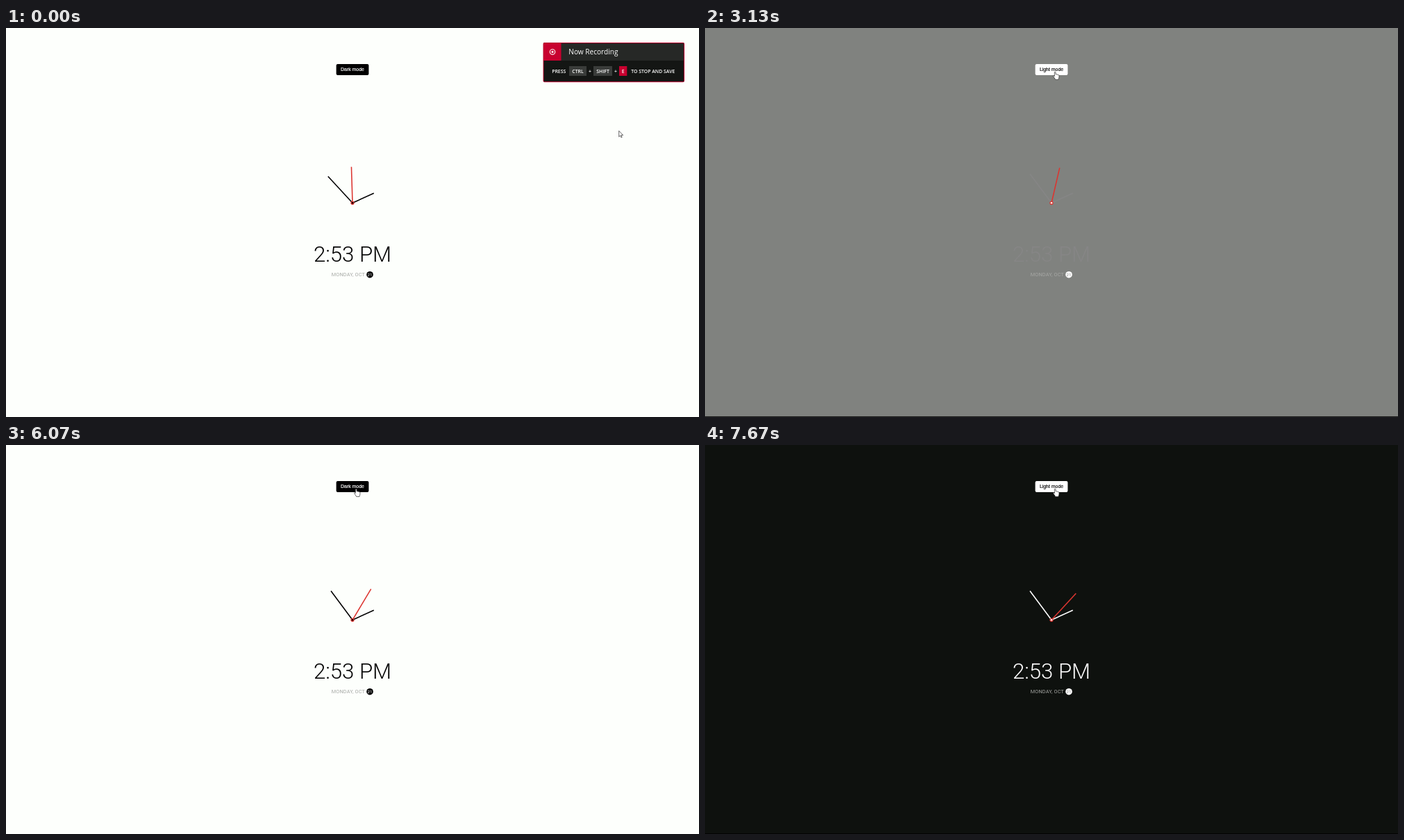
Animation, 998 px wide and 561 px high, one loop 8 s. Source, as an HTML page:

```html
<!DOCTYPE html>
<html lang="en">
<head>
<meta charset="utf-8">
<title>Theme clock</title>
<style>
  html, body { margin: 0; width: 100%; height: 100%; overflow: hidden; background: #fdfffc; }
  svg { display: block; width: 100vw; height: 100vh; }
  text { text-anchor: middle; font-family: Roboto, sans-serif; }
  .button { font: 6.93px "Liberation Sans", Arial, sans-serif; stroke-width: .18; }
  .time { font-size: 31.2px; font-weight: 300; }
  .date { font-size: 7.28px; letter-spacing: .156px; text-anchor: start; fill: #a6a8a5; }
  .day { font-size: 6.24px; }
  #panel text { font: 600 6.9px "Open Sans", "Noto Sans", sans-serif; fill: #fff; }
  #panel .title { font-size: 10.1px; font-weight: 500; text-anchor: start; }
</style>
</head>
<body>
<svg viewBox="0 0 998 561" preserveAspectRatio="none">
  <rect id="page" width="998" height="561"/>
  <rect id="edge" y="560" width="998" height="1" fill="#000"/>

  <rect id="button" x="475.6" y="52" width="46.8" height="16.1" rx="2"/>
  <text id="label" class="button" x="499" y="62.4"></text>

  <g transform="translate(499 252.3)">
    <rect id="hour" x="-.78" y="-33.8" width="1.56" height="33.8"/>
    <rect id="minute" x="-.78" y="-52" width="1.56" height="52"/>
    <rect id="second" x="-.78" y="-52" width="1.56" height="52" fill="#dc3530"/>
    <circle r="2.6" fill="#dc3530"/>
    <circle id="pin" r="1.3"/>
  </g>

  <text id="time" class="time" x="499" y="337.4">2:53 PM</text>
  <text class="date" x="468.8" y="358.1">MONDAY, OCT</text>
  <circle id="badge" cx="524" cy="355.7" r="4.8"/>
  <text id="day" class="day" x="524" y="358">21</text>

  <g id="panel">
    <rect x="774" y="21.5" width="202.6" height="56.2" rx="1.5" fill="#141614"/>
    <rect x="774" y="21.5" width="202.6" height="25.5" fill="#262826"/>
    <rect x="774" y="21.5" width="25.5" height="25.5" fill="#c8002f"/>
    <rect x="774" y="21.5" width="202.6" height="56.2" rx="1.5" fill="none" stroke="#b8062f"/>
    <circle cx="787" cy="34.4" r="3.7" fill="none" stroke="#fff" stroke-width="1.1"/>
    <circle cx="787" cy="34.4" r="1.6" fill="#fff"/>
    <text class="title" x="810.3" y="38.3">Now Recording</text>
    <rect x="811" y="55" width="25" height="14" fill="#3a3c3a"/>
    <rect x="846" y="55" width="27" height="14" fill="#3a3c3a"/>
    <rect x="883" y="55" width="11.3" height="14" fill="#c8002f"/>
    <text x="796.2" y="64.9">PRESS</text>
    <text x="823.5" y="64.9">CTRL</text>
    <text x="841" y="64.9">+</text>
    <text x="859.5" y="64.9">SHIFT</text>
    <text x="878" y="64.9">+</text>
    <text x="888.6" y="64.9">E</text>
    <text x="931.8" y="64.9">TO STOP AND SAVE</text>
  </g>

  <g id="cursor" fill="#fff" stroke="#222" stroke-width="1.3" stroke-linejoin="round">
    <path id="arrow" d="M0 0V16.5L3.8 13 6.2 18.6 8.6 17.6 6.2 12H11.5Z"/>
    <path id="hand" d="M-1.7 1.5C-1.7-.5 1.7-.5 1.7 1.5V7C2.5 6.2 4.6 6.4 4.9 7.8C5.8 7 7.7 7.3 8 8.6C9 8 11 8.4 11 10.2V14.5C11 17 9.6 18.5 9.2 21.5H.6C0 18.5-3.6 15.5-5.2 12.2C-5.7 10.4-3.6 9.9-2.6 11.2L-1.7 12.4Z"/>
  </g>
</svg>
<script>
const LOOP = 8000;
const LEAD = 25;               // each tick begins this long before the full second
const STEP = 360 / 59;         // degrees per second or minute
const CLICKS = [2793, 4512, 6670];
const LIGHT = [253, 255, 252], DARK = [14, 17, 14];
const BLACK = [0, 0, 0], WHITE = [255, 255, 255], GREY = [136, 138, 135];

const el = {};
document.querySelectorAll('[id]').forEach(node => el[node.id] = node);

const clamp = x => Math.min(1, Math.max(0, x));
const lerp = (a, b, p) => a + (b - a) * p;
const mix = (a, b, p) => `rgb(${a.map((v, i) => Math.round(lerp(v, b[i], p)))})`;
const smooth = x => x * x * (3 - 2 * x);
const set = (node, name, value) => node.setAttribute(name, value);
const turn = (node, angle) => set(node, 'transform', `rotate(${angle})`);

// cubic-bezier(.42, 0, 1, 1)
function easeIn(x) {
  x = clamp(x);
  let lo = 0, hi = 1;
  for (let i = 0; i < 24; i++) {
    const s = (lo + hi) / 2, r = 1 - s;
    if (1.26 * s * r * r + 3 * s * s * r + s * s * s < x) lo = s; else hi = s;
  }
  return smooth(lo);
}

// 0 is light, 1 is dark
function theme(t, duration) {
  const past = CLICKS.filter(c => c <= t);
  if (!past.length) return 0;
  const p = easeIn((t - past[past.length - 1]) / duration);
  return past.length % 2 ? p : 1 - p;
}

function drawClock(t) {
  const sec = Math.floor((t + LEAD) / 1000);
  const p = easeIn((t + LEAD - sec * 1000) / 500);
  // the hand winds back a full turn at second zero
  turn(el.second, lerp(sec ? (sec - 1) * STEP : 360, sec * STEP, p));
  turn(el.minute, lerp(52, 53, sec ? 1 : p) * STEP);
  turn(el.hour, 2 * 360 / 11);
}

function drawTheme(t) {
  const dark = CLICKS.filter(c => c <= t).length % 2 === 1;
  const fade = theme(t, 500), quick = theme(t, 300);
  const ink = mix(BLACK, WHITE, fade);
  set(el.page, 'fill', mix(LIGHT, DARK, fade));
  set(el.edge, 'opacity', .8 * quick);
  [el.hour, el.minute, el.time].forEach(node => set(node, 'fill', ink));
  set(el.badge, 'fill', mix(BLACK, WHITE, quick));
  set(el.day, 'fill', mix(WHITE, GREY, quick));
  set(el.pin, 'fill', dark ? '#fff' : '#000');
  set(el.button, 'fill', dark ? '#fff' : '#000');
  set(el.label, 'fill', dark ? '#111' : '#fff');
  set(el.label, 'stroke', dark ? '#111' : '#fff');
  el.label.textContent = dark ? 'Light mode' : 'Dark mode';
}

function drawCursor(t) {
  const p = smooth(clamp((t - 1980) / 780));
  const x = lerp(882.7, 504.2, p), y = lerp(148.3, 63.2, p);
  const over = x > 475 && x < 523 && y > 52 && y < 68;
  set(el.cursor, 'transform', `translate(${x} ${y}) scale(.52)`);
  set(el.arrow, 'visibility', over ? 'hidden' : 'visible');
  set(el.hand, 'visibility', over ? 'visible' : 'hidden');
}

function draw(t) {
  drawClock(t);
  drawTheme(t);
  drawCursor(t);
  set(el.panel, 'opacity', 1 - clamp((t - 70) / 200));
}

const start = performance.now();
function loop() {
  draw((performance.now() - start) % LOOP);
  requestAnimationFrame(loop);
}
draw(0);
requestAnimationFrame(loop);
</script>
</body>
</html>
```
